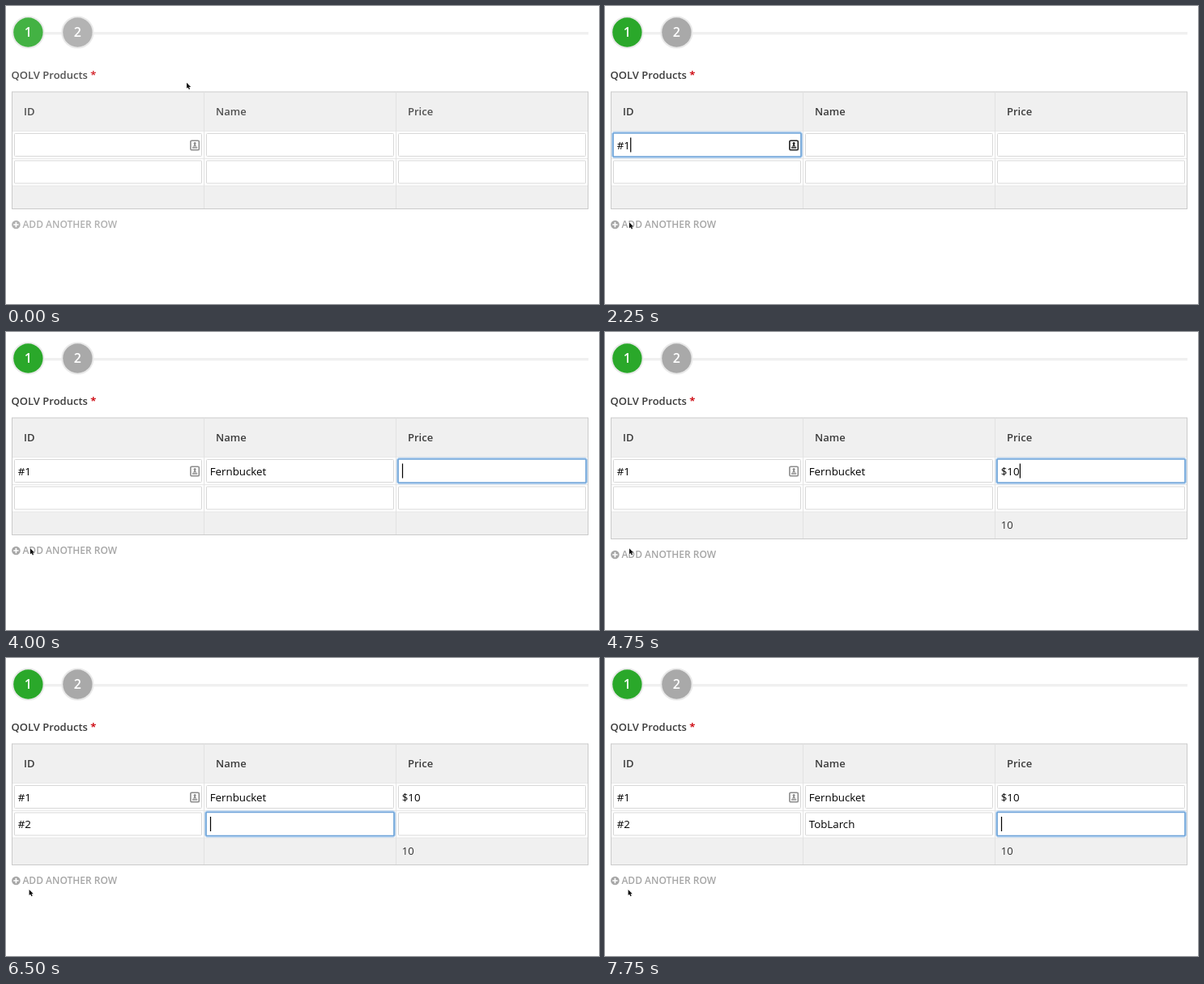
Write an HTML page that moves like this. It is 732 px wide and 368 px high and loops after 8 s.

```html
<!DOCTYPE html>
<html lang="en">
<head>
<meta charset="utf-8">
<title>Table form</title>
<style>
  html, body { margin: 0; width: 100%; height: 100%; overflow: hidden; background: #fff; }
  svg { display: block; width: 732px; height: 368px; font-family: "Open Sans", sans-serif; }
  text { white-space: pre; }
  .bold { font-weight: 600; font-size: 13px; fill: #3c3c3c; }
  .num { font-weight: 600; font-size: 16px; fill: #fff; text-anchor: middle; }
  .val { font-size: 13.33px; fill: #000; }
  .field { fill: #fff; stroke: #d8d8d8; }
  .glow { fill: none; stroke: #a9cbee; stroke-width: 4.4; opacity: .75; }
  .ring { fill: #fff; stroke: #70a5d9; stroke-width: 1.7; }
  .fade { animation: fade 8s step-end infinite; }
  @keyframes fade { 0% { opacity: .88 } 3.125% { opacity: .96 } 6.25% { opacity: 1 } }
</style>
</head>
<body>
<svg viewBox="0 0 732 368">
  <rect x="40" y="32" width="679" height="3.4" fill="#f0f0f0"/>
  <g stroke="#e9e9e9" stroke-width="2.2">
    <circle cx="27.4" cy="32.5" r="19" fill="#fff"/>
    <circle cx="88.4" cy="32.5" r="19" fill="#fff"/>
  </g>
  <g class="fade">
    <circle cx="27.4" cy="32.5" r="18.2" fill="#2aa82a"/>
    <circle cx="88.4" cy="32.5" r="18.2" fill="#a9a9a9"/>
    <text class="num" x="27.4" y="38.4">1</text>
    <text class="num" x="88.4" y="38.4">2</text>
    <text class="bold" x="6.6" y="90.4">QOLV Products <tspan fill="#d0141c" font-weight="700">*</tspan></text>
  </g>

  <rect id="table" x="7.5" y="106" width="711" height="144.5" fill="#f0f0f0" stroke="#cbcbcb"/>
  <rect x="8" y="155" width="710" height="67" fill="#fff"/>
  <path d="M8 154.5H718M8 188.5H718M8 222H718" stroke="#e8e8e8"/>
  <path id="cols" stroke="#e2e2e2"/>
  <g class="fade bold">
    <text x="22" y="135">ID</text>
    <text x="259" y="135">Name</text>
    <text x="496" y="135">Price</text>
  </g>

  <g id="fields"></g>
  <g id="focus">
    <rect class="glow" width="232" height="29" rx="2"/>
    <rect class="ring" width="232" height="29" rx="1"/>
  </g>
  <g id="icon" transform="translate(227 165.3)">
    <rect x=".9" y=".9" width="10.4" height="11.6" rx="1.4" fill="#fff" stroke="currentColor" stroke-width="1.6"/>
    <circle cx="6.1" cy="4.3" r="1.5" fill="currentColor"/>
    <path d="M5.2 5H7V6.6L8.8 8.2H3.4L5.2 6.6ZM3 9H9.2V10.4H3Z" fill="currentColor"/>
  </g>
  <g id="values"></g>
  <rect id="caret" width="1.2" height="18" fill="#000"/>
  <text id="total" x="488.8" y="243" font-size="13" fill="#333">10</text>

  <g id="add">
    <g class="fade">
      <circle cx="12.4" cy="270" r="5.3" fill="#a6a6a6"/>
      <path d="M9.2 270H15.6M12.4 266.8V273.2" stroke="#fff" stroke-width="1.7"/>
      <text x="20.4" y="274.4" font-size="12" font-weight="600" fill="#a6a6a6">ADD ANOTHER ROW</text>
    </g>
  </g>
  <path id="cursor" d="M0 0V7L1.6 5.7L2.8 8.3L4.1 7.7L3 5.2H5.2Z" fill="#111" stroke="#fff" stroke-width=".7" paint-order="stroke"/>
</svg>
<script>
const LOOP = 8000;
const $ = id => document.getElementById(id);

// [time, focused cell, its text]
const typing = [
  [1250, 0, ''], [1750, 0, '#'], [2250, 0, '#1'],
  [2500, 1, ''], [2750, 1, 'F'], [3000, 1, 'Fer'], [3250, 1, 'Fernb'],
  [3500, 1, 'Fernbuc'], [3750, 1, 'Fernbucket'],
  [4000, 2, ''], [4500, 2, '$'], [4750, 2, '$10'],
  [5500, 3, ''], [6000, 3, '#'], [6250, 3, '#2'],
  [6500, 4, ''], [6750, 4, 'T'], [7000, 4, 'Tob'], [7500, 4, 'TobLarch'],
  [7750, 5, '']
];

// [time, x, y]
const pointer = [
  [0, 223, 94.7], [250, 208, 110], [500, 128, 188], [750, 46, 257], [1000, 30, 267.3],
  [5750, 29, 278], [6000, 28.6, 286]
];

const cellX = i => 10.5 + 237 * (i % 3);
const cellY = i => 157.5 + 33.5 * Math.floor(i / 3);

function make(parent, tag, attrs) {
  const el = document.createElementNS('http://www.w3.org/2000/svg', tag);
  for (const key in attrs) el.setAttribute(key, attrs[key]);
  return parent.appendChild(el);
}

const values = [...Array(6).keys()].map(i => {
  make($('fields'), 'rect', { class: 'field', x: cellX(i), y: cellY(i), width: 231, height: 28, rx: 1 });
  return make($('values'), 'text', { class: 'val', x: cellX(i) + 4.2, y: cellY(i) + 19.4 });
});

function draw(t) {
  const texts = Array(6).fill('');
  let cell = -1;
  for (const [time, i, text] of typing) {
    if (time > t) break;
    cell = i;
    texts[i] = text;
  }
  values.forEach((el, i) => {
    if (el.textContent !== texts[i]) el.textContent = texts[i];
  });

  const focused = cell >= 0;
  const blink = t >= 5000 && t < 5500;
  $('focus').style.display = focused ? '' : 'none';
  $('caret').style.display = focused && !blink ? '' : 'none';
  if (focused) {
    const width = texts[cell] ? values[cell].getComputedTextLength() : 0;
    $('focus').setAttribute('transform', `translate(${cellX(cell) - .5} ${cellY(cell) - .5})`);
    $('caret').setAttribute('x', cellX(cell) + 4.4 + width);
    $('caret').setAttribute('y', cellY(cell) + 5);
  }

  const summed = t >= 4750;
  const grow = summed ? 5 : 0;
  $('total').style.display = summed ? '' : 'none';
  $('table').setAttribute('height', 144.5 + grow);
  $('cols').setAttribute('d', `M244.5 106.5V${250 + grow}M481.5 106.5V${250 + grow}`);
  $('add').setAttribute('transform', `translate(0 ${grow})`);
  $('icon').style.color = t >= 1000 && t < 2500 ? '#222' : '#8c8c8c';

  const [, x, y] = pointer.filter(p => p[0] <= t).pop();
  $('cursor').setAttribute('transform', `translate(${x} ${y})`);
}

function tick() {
  draw(performance.now() % LOOP);
  requestAnimationFrame(tick);
}
tick();
</script>
</body>
</html>
```
